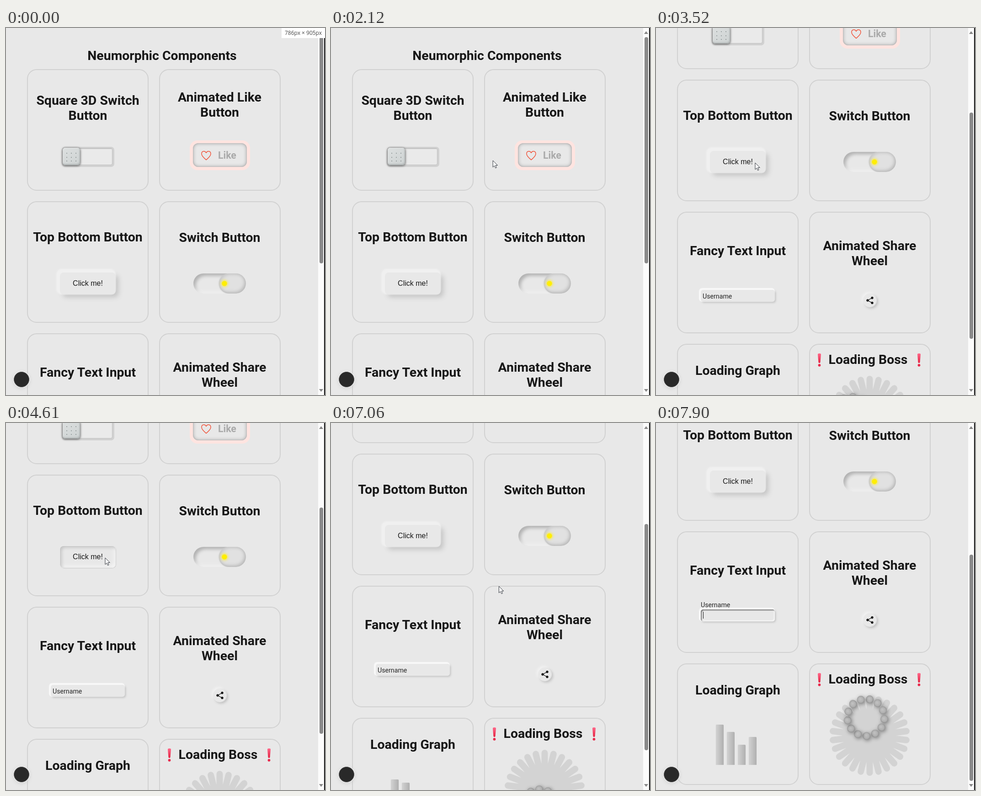
An HTML page with a canvas that plays this animation: 698 by 803 pixels, repeating every 7990 ms.

```html
<!DOCTYPE html>
<html lang="en">
<head>
<meta charset="utf-8">
<title>Neumorphic Components</title>
<style>
html, body { margin: 0; width: 100%; height: 100%; overflow: hidden; background: #e8e8e8; }
#stage { position: absolute; left: 0; top: 0; width: 698px; height: 803px; overflow: hidden;
  background: #e8e8e8; color: #171717; font-family: Roboto, sans-serif; }
#stage * { box-sizing: border-box; }
#stage div, #stage canvas, #stage svg, #stage h2 { position: absolute; }
#page { left: 0; top: 0; width: 683px; height: 1234px; }
h2 { margin: 0; font-size: 28.42px; line-height: 33.6px; font-weight: 700; white-space: nowrap;
  text-align: center; transform: translate(-50%, -50%); }
.card { width: 266px; height: 266px; border: 2px solid #d1d1d1; border-radius: 21px; }

#slot { left: 122px; top: 260px; width: 115px; height: 44px; border-radius: 7px;
  border: 4px solid #d1d1d1; border-top-width: 3px; background: #eaeaea;
  box-shadow: inset 1px 1px 2px #a2a2a2, inset -1px -1px 1px #c2c2c2; }
#block { left: 124px; top: 262px; width: 38px; height: 38px; border-radius: 6px;
  background: linear-gradient(145deg, #dde0e0, #cdd2d2);
  box-shadow: 0 1px 4px 1px #6c6c6c, inset -1px -2px 3px #adb2b2, inset 1px 1px 2px #e6e8e8; }
#block i { position: absolute; width: 2px; height: 2px; border-radius: 1px; background: #858c8c; }

#like { left: 402px; top: 246px; width: 132px; height: 65px; border-radius: 17px; }
#pad { left: 7px; top: 6px; width: 118px; height: 52px; border-radius: 12px; background: #e8e8e8;
  box-shadow: inset 0 0 7px 1px #aaa, inset 0 0 2px #aaa; }
#like span { position: absolute; left: 62px; top: 19px; font: 700 21.3px/28px Roboto, sans-serif; color: #aaa; }

#push { left: 118px; top: 535px; width: 122px; height: 48px; border-radius: 8px;
  font: 16px/48px "Liberation Sans", Arial, sans-serif; text-align: center; background: #e8e8e8; }

#track { left: 410px; top: 537px; width: 115px; height: 44px; border-radius: 22px; overflow: hidden;
  box-shadow: inset -5px -5px 7px #efefef, inset 5px 5px 7px #b2b2b2; }
#knob { top: 0; height: 44px; border-radius: 22px; background: #e1e1e1;
  box-shadow: inset -3px -3px 7px #b8b8b8, inset 3px 3px 6px #cacaca, 0 0 3px #c4c4c4; }
#lamp { top: 22px; border-radius: 50%; transform: translate(-50%, -50%); }

#field { left: 98px; top: 839px; width: 162px; height: 26px; border-radius: 5px; background: #e8e8e8; }
#label { left: 102px; top: 842.5px; font-size: 14.2px; line-height: 20px; color: #262626; }
#caret { left: 103px; top: 844px; width: 1px; height: 15px; background: #111; }

#share { left: 453px; top: 847px; width: 30px; height: 30px; border-radius: 50%; background: #e8e8e8;
  box-shadow: 3px 3px 5px #c3c3c3, -3px -3px 5px #f2f2f2; }
.bar { width: 17px; background: linear-gradient(90deg, #d2d2d2, #b0b0b0); border-radius: 2px 2px 0 0;
  box-shadow: 0 0 1px #c4c4c4; }
#boss { left: 352px; top: 1000px; }

#badge { left: 17px; top: 752px; width: 34px; height: 34px; border-radius: 50%; background: #292929;
  border: 1px solid #555; box-shadow: 0 0 1px 1px #f4f4f4, 0 2px 8px #ccc; }
#gutter { left: 683px; top: 0; width: 13px; height: 803px; background: #fbfbfb; }
#thumb { left: 3px; top: 0; width: 8px; height: 495px; border-radius: 4px; background: #8a8a8a; }
#edge { left: 696px; top: 0; width: 2px; height: 803px; background: #161616; }
#size { left: 603px; top: 0; width: 95px; height: 22px; background: #fff; color: #484848;
  font: 12px/22px "Open Sans", sans-serif; text-align: center; white-space: nowrap; }
#cursor { left: 0; top: 0; }
</style>
</head>
<body>
<div id="stage">
  <div id="page">
    <div id="slot"></div>
    <div id="block"></div>
    <div id="like">
      <div id="pad"></div>
      <svg width="24" height="24" style="left:24px;top:21px">
        <path id="heart" d="M12 21.5C8 18 2 13.5 2 8.2C2 2 9.5 .8 12 6.2C14.5 .8 22 2 22 8.2C22 13.5 16 18 12 21.5Z"
          stroke="#f0553c" stroke-width="1.5" stroke-linejoin="round"/>
      </svg>
      <span>Like</span>
    </div>
    <div id="push">Click me!</div>
    <div id="track"><div id="knob"></div><div id="lamp"></div></div>
    <div id="field"></div>
    <div id="label">Username</div>
    <div id="caret"></div>
    <div id="share">
      <svg width="30" height="30" fill="#171717" stroke="#171717">
        <path d="M20 9.5L10 15L20 20.5" fill="none" stroke-width="1.4"/>
        <circle cx="20" cy="9.5" r="2.3"/><circle cx="10" cy="15" r="2.3"/><circle cx="20" cy="20.5" r="2.3"/>
      </svg>
    </div>
    <canvas id="boss" width="231" height="231"></canvas>
  </div>
  <div id="badge"></div>
  <div id="gutter">
    <div id="thumb"></div>
    <svg width="13" height="803" fill="#858585"><path d="M6.5 7l4.5 6h-9zM6.5 796l4.5-6h-9z"/></svg>
  </div>
  <div id="edge"></div>
  <div id="size">786px × 905px</div>
  <canvas id="cursor" width="698" height="803"></canvas>
</div>
<script>
const LOOP = 7990;
const $ = id => document.getElementById(id);
const page = $('page');
const boss = $('boss').getContext('2d');
const pointer = $('cursor').getContext('2d');

const clamp = u => Math.max(0, Math.min(1, u));
const lerp = (a, b, u) => a + (b - a) * u;
const ramp = (t, from, len) => { const u = clamp((t - from) / len); return u * u * (3 - 2 * u); };
const hold = (t, on, off, len) => ramp(t, on, len) - ramp(t, off, len);
const sine = (t, a, b) => (1 - Math.cos(Math.PI * clamp((t - a) / (b - a)))) / 2;
const mix = (a, b, u) => `rgb(${a.map((v, i) => Math.round(lerp(v, b[i], u)))})`;

function add(tag, className, left, top, html = '') {
  const el = document.createElement(tag);
  el.className = className;
  el.style.left = left + 'px';
  el.style.top = top + 'px';
  el.innerHTML = html;
  page.append(el);
  return el;
}

// Static layout
[
  ['Neumorphic Components', 341.5, 61],
  ['Square 3D Switch<br>Button', 179, 175.8],
  ['Animated Like<br>Button', 467.5, 168.8],
  ['Top Bottom Button', 179, 457.8],
  ['Switch Button', 467.5, 458.8],
  ['Fancy Text Input', 179, 753.8],
  ['Animated Share<br>Wheel', 467.5, 759.8],
  ['Loading Graph', 179, 1016.3],
  ['Loading Boss', 464, 992.3]
].forEach(([text, x, y]) => add('h2', '', x, y, text));

for (let i = 0; i < 8; i++) {
  page.prepend(add('div', 'card', i % 2 ? 334.5 : 46, 90 + 289 * (i >> 1)));
}
for (let i = 0; i < 9; i++) {
  $('block').innerHTML += `<i style="left:${8 + i % 3 * 10}px;top:${11 + Math.floor(i / 3) * 8.5}px"></i>`;
}
for (const x of [351, 569]) {
  add('div', '', x, 977, `<svg width="13" height="32">
    <linearGradient id="red${x}" x2="0" y2="1"><stop stop-color="#ff6a8c"/><stop offset="1" stop-color="#e3203f"/></linearGradient>
    <path d="M3 3Q3 1 6.5 1T10 3L8.6 20Q8.4 22 6.5 22T4.4 20Z" fill="url(#red${x})"/>
    <circle cx="6.5" cy="26.8" r="2.9" fill="#e8294b"/></svg>`);
}
const bars = [7034, 7169, 7318, 6790].map((peak, i) => ({ peak, el: add('div', 'bar', 131 + 24 * i, 0) }));

const scrollAt = t => 266 * sine(t, 3040, 3500) + 165 * sine(t, 6907, 7340);

function drawBoss(t) {
  const c = boss, reach = 81;
  c.clearRect(0, 0, 231, 231);
  c.save();
  c.translate(115.5, 115);
  c.lineCap = 'round';
  c.lineWidth = 14;
  c.strokeStyle = '#d3d3d3';
  const dirs = Array.from({ length: 13 }, (_, i) => i * Math.PI / 13 - Math.PI / 2);
  c.beginPath();
  for (const a of dirs) {
    const x = reach * Math.cos(a), y = reach * Math.sin(a);
    c.moveTo(-x, -y);
    c.lineTo(x, y);
  }
  c.stroke();
  // Each ball swings along its own diameter; together they form a rolling circle.
  const phase = (t - 7900) / 1980 * 2 * Math.PI - 102 * Math.PI / 180;
  for (const a of dirs) {
    const r = reach * Math.cos(phase - a), x = r * Math.cos(a), y = r * Math.sin(a);
    const shade = c.createRadialGradient(x - 1.5, y - 1.5, 1, x, y, 8.5);
    shade.addColorStop(0, '#c0c0c0');
    shade.addColorStop(0.7, '#b0b0b0');
    shade.addColorStop(1, '#929292');
    c.shadowColor = 'rgba(0,0,0,.42)';
    c.shadowBlur = 9;
    c.shadowOffsetX = c.shadowOffsetY = 2;
    c.fillStyle = shade;
    c.beginPath();
    c.arc(x, y, 8.4, 0, 7);
    c.fill();
  }
  c.restore();
}

const arrow = new Path2D('M0 0V14.5L3.4 11.4L5.7 16.5L8 15.5L5.8 10.5H10.3Z');
const hand = new Path2D('M-1.5 1Q0 -1 1.5 1V7Q3 5.5 4.2 7.2Q5.7 6 6.7 7.9Q8.5 7 9 9V13Q9 16 7 18H0Q-2 16 -3 14L-5 10.5Q-5 8 -3 9L-1.5 10.5Z');
const trail = [
  [300, 692, 110], [1030, 214, 288], [1110, 216, 294], [1860, 216, 294], [2120, 354, 290],
  [2420, 415, 277], [3060, 415, 276], [3480, 217, 295], [4870, 217, 295],
  [5350, 475, 303], [6560, 475, 303], [7060, 368, 357], [7440, 150, 424]
];

function drawCursor(t) {
  const c = pointer;
  c.clearRect(0, 0, 698, 803);
  const i = trail.findIndex(p => p[0] > t);
  if (i < 1) return;
  const [t0, x0, y0] = trail[i - 1], [t1, x1, y1] = trail[i];
  const u = (t - t0) / (t1 - t0);
  const overSwitch = (t > 1040 && t < 1880) || (t > 5270 && t < 6650);
  const shape = overSwitch ? hand : arrow;
  c.save();
  c.translate(lerp(x0, x1, u), lerp(y0, y1, u));
  c.fillStyle = '#fff';
  c.strokeStyle = '#30343c';
  c.fill(shape);
  c.stroke(shape);
  c.restore();
}

function render(t) {
  page.style.transform = `translateY(${-Math.round(scrollAt(t))}px)`;
  $('thumb').style.top = 20 + 0.6218 * scrollAt(t + 20) + 'px';
  $('size').style.display = t < 500 ? '' : 'none';

  $('block').style.transform = `translateX(${71 * hold(t, 1110, 1740, 230)}px)`;

  const love = hold(t, 2340, 3110, 180);
  $('like').style.transform = `scale(${1 + 0.09 * love})`;
  $('like').style.background = mix([255, 228, 224], [255, 161, 150], love);
  $('heart').style.fill = `rgba(255,75,51,${love})`;

  const press = hold(t, 3800, 4060, 100) + hold(t, 4310, 4590, 100);
  const lift = 1 - press;
  $('push').style.boxShadow =
    `${-4 * lift}px ${-4 * lift}px ${3 * lift}px ${4 * lift}px #f0f0f0, ${6 * lift}px ${6 * lift}px ${11 * lift}px #c4c4c4,` +
    `inset ${4 * press}px ${4 * press}px ${9 * press}px #c4c4c4, inset ${-4 * press}px ${-4 * press}px ${9 * press}px #f6f6f6`;

  const lit = 1 - hold(t, 5450, 6200, 300);
  $('knob').style.left = 56 * lit + 'px';
  $('knob').style.width = lerp(66, 59, lit) + 'px';
  const lamp = $('lamp').style;
  lamp.left = lerp(20, 67.5, lit) + 'px';
  lamp.width = lamp.height = lerp(9, 11, lit) + 'px';
  lamp.background = mix([180, 177, 140], [255, 238, 0], lit);
  lamp.boxShadow = `0 0 ${5 * lit}px ${2 * lit}px rgba(255,238,40,${0.8 * lit})`;

  const focus = ramp(t, 7500, 220);
  $('label').style.transform = `translate(${-4 * focus}px, ${-24.5 * focus}px)`;
  $('field').style.boxShadow = '-2px -2px 1px 2px #f8f8f8, 2px 2px 4px #c0c0c0' +
    `, inset ${2 * focus}px ${2 * focus}px 2px rgba(120,120,120,${focus})` +
    `, inset ${-2 * focus}px ${-2 * focus}px 2px rgba(246,246,246,${focus})`;
  $('caret').style.display = t >= 7520 ? '' : 'none';

  for (const { peak, el } of bars) {
    const h = 60 + 28 * Math.cos(2 * Math.PI * (t - peak) / 891);
    el.style.height = h + 'px';
    el.style.top = 1179 - h + 'px';
  }
  drawBoss(t);
  drawCursor(t);
}

const start = performance.now();
function tick() {
  render((performance.now() - start) % LOOP);
  requestAnimationFrame(tick);
}
render(0);
requestAnimationFrame(tick);
</script>
</body>
</html>
```
